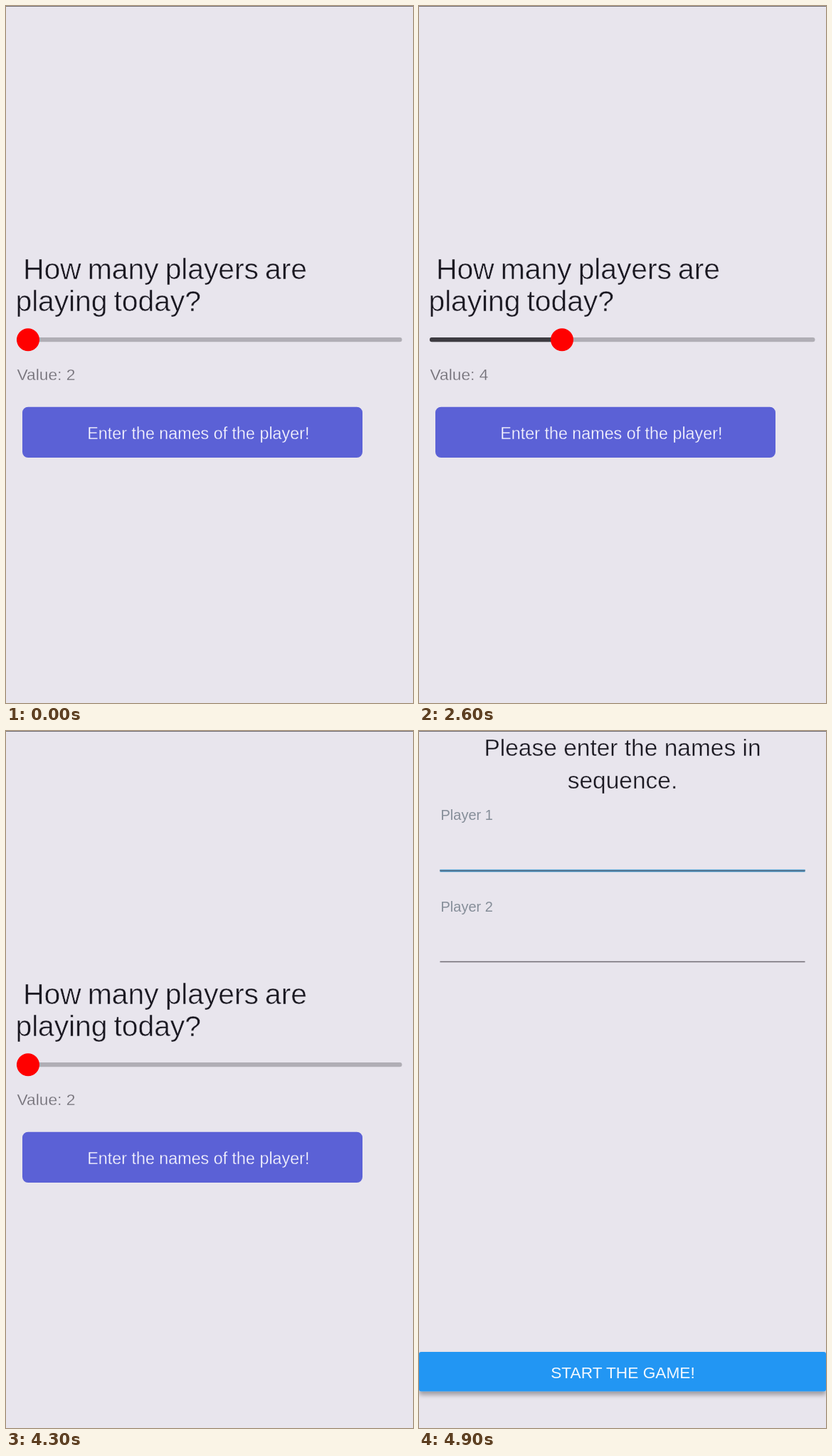
An HTML page for the animation above (5000 ms loop, 572 by 980 pixels).

```html
<!DOCTYPE html>
<html lang="en">
<head>
<meta charset="utf-8">
<title>Player setup</title>
<style>
  html, body { margin: 0; width: 100%; height: 100%; overflow: hidden; background: #e8e5ed; }
  svg { display: block; width: 100%; height: 100%; }
  /* a hairline in the backdrop colour gives the text a lighter weight */
  text { font-family: "Liberation Sans", Arial, sans-serif; white-space: pre; stroke: #e8e5ed; stroke-width: .3px; }
  .title { font-size: 41px; letter-spacing: -.15px; word-spacing: -2px; fill: #1a1821; stroke-width: .6px; }
  .value { font-size: 22.8px; fill: #716e76; }
  .action { font-size: 23.3px; fill: #f8f7fe; stroke: #5b61d6; }
  .head { font-size: 33.5px; fill: #1a1821; text-anchor: middle; stroke-width: .45px; }
  .label { font-size: 20px; fill: #868e99; stroke: none; }
  .start { font-size: 22.7px; fill: #f2f8fe; text-anchor: middle; stroke: none; }
  .line { fill: #706c74; }
</style>
</head>
<body>
<svg viewBox="0 0 572 980">
  <defs>
    <filter id="shadow" x="-5%" y="-30%" width="110%" height="180%">
      <feDropShadow dx="0" dy="5" stdDeviation="3" flood-color="#000" flood-opacity=".32"/>
    </filter>
  </defs>
  <rect width="572" height="980" fill="#e8e5ed"/>

  <g id="setup">
    <text class="title" x="24" y="384.3">How many players are</text>
    <text class="title" x="13.5" y="429.3">playing today?</text>
    <rect x="15" y="466" width="541.5" height="6.2" rx="3" fill="#b0aeb5"/>
    <rect id="fill" x="15" y="466" height="6.2" rx="3" fill="#3e3c42"/>
    <circle id="knob" cy="469.2" r="16" fill="#f00"/>
    <text id="value" class="value" x="15.5" y="526"></text>
    <rect x="23" y="563.7" width="478" height="71.3" rx="8" fill="#5b61d6"/>
    <text class="action" x="114.3" y="609">Enter the names of the player!</text>
  </g>

  <g id="names">
    <rect width="572" height="980" fill="#e8e5ed"/>
    <g id="form">
      <text class="head" x="286" y="35">Please enter the names in</text>
      <text class="head" x="286" y="81">sequence.</text>
      <text class="label" x="30.5" y="125.3">Player 1</text>
      <rect class="line" x="29.5" y="195" width="513" height="1.5"/>
      <g id="focus">
        <rect x="29.5" y="194.8" width="513" height="3.4" fill="#3a8fc4"/>
        <rect class="line" x="29.5" y="196" width="513" height="1"/>
      </g>
      <text class="label" x="30.5" y="254.2">Player 2</text>
      <rect class="line" x="29.5" y="323.7" width="513" height="1.5"/>
      <rect y="873" width="572" height="55.5" rx="3" fill="#2196f3" filter="url(#shadow)"/>
      <text class="start" x="286.5" y="910">START THE GAME!</text>
    </g>
  </g>

  <rect width="572" height="1" fill="#716e75"/>
</svg>
<script>
  const LOOP = 5000, STEP = 100;
  const MIN = 2, FIRST_X = 31, GAP = 85;
  // [time, players] each time the slider snaps to a new stop
  const stops = [[0, 2], [2500, 3], [2600, 4], [3400, 3], [3500, 2]];
  const OPEN = 4300, OPEN_MS = 200, FOCUS = 4900;

  const $ = id => document.getElementById(id);
  const show = (el, on) => el.setAttribute("visibility", on ? "inherit" : "hidden");

  function setSlider(n) {
    const x = FIRST_X + (n - MIN) * GAP;
    $("knob").setAttribute("cx", x);
    $("fill").setAttribute("width", x - 15);
    $("value").textContent = "Value: " + n;
  }

  function setNames(t) {
    const left = 1 - Math.min(1, Math.max(0, (t - OPEN) / OPEN_MS));
    show($("names"), left < 1);
    $("names").setAttribute("opacity", 1 - left ** 2.5);
    $("form").setAttribute("transform", `translate(0 ${120 * left ** 3})`);
    show($("focus"), t >= FOCUS);
  }

  function draw(ms) {
    const t = Math.floor((ms % LOOP) / STEP) * STEP;
    setSlider(stops.filter(s => s[0] <= t).pop()[1]);
    setNames(t);
  }

  let begin;
  function tick(now) {
    begin ??= now;
    draw(now - begin);
    requestAnimationFrame(tick);
  }
  draw(0);
  requestAnimationFrame(tick);
</script>
</body>
</html>
```
